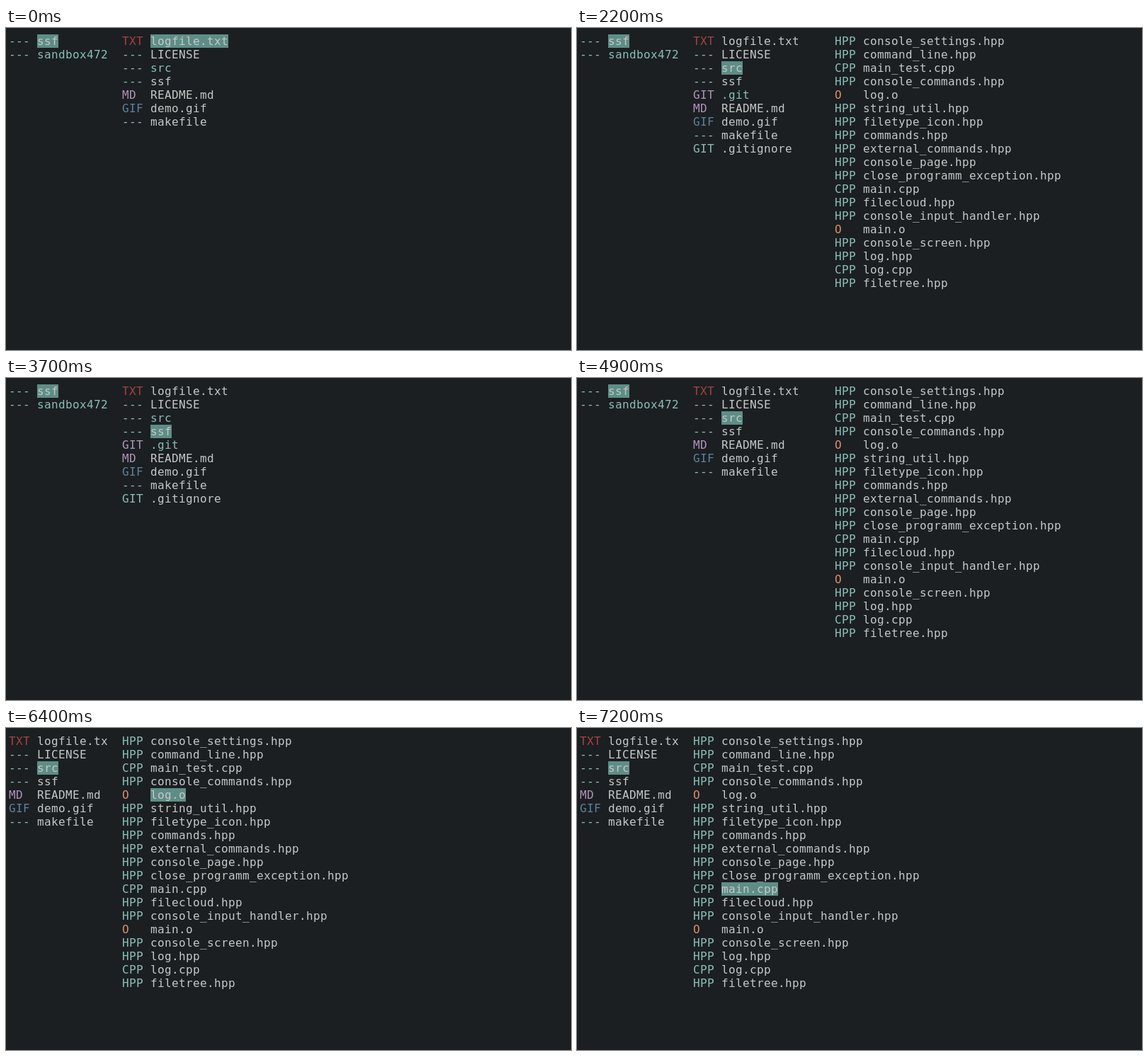
An HTML page with a canvas for the animation above (8 s loop, 798x455 px).

```html
<!DOCTYPE html>
<html lang="en">
<head>
<meta charset="utf-8">
<title>Terminal file browser</title>
<style>
  html, body { margin: 0; width: 100%; height: 100%; overflow: hidden; background: #1b1f22; }
  canvas { display: block; }
</style>
</head>
<body>
<canvas id="screen" width="798" height="455"></canvas>
<script>
const ctx = document.getElementById('screen').getContext('2d');
const LOOP = 8000, CELL = 10, ROW = 19, LEFT = 4, TOP = 9, ASCENT = 15;
const COLUMNS = [0, 16, 36];
const ICON_WIDTH = 4, PARENT_NAME_WIDTH = 10;
const BACK = '#1b1f22', TEXT = '#c5c8c6', TEAL = '#8abeb7', MARK = '#5e8d87';
const ICON_COLORS = { TXT: '#a54242', MD: '#b294bb', GIF: '#5f819d', O: '#de8f6c' };

// A trailing slash marks a directory.
function parse(list) {
  return list.trim().split(/\s+/).map(item => {
    const isDir = item.endsWith('/');
    const name = item.replace('/', '');
    const ext = name.includes('.') ? name.split('.').pop().toUpperCase() : '---';
    const icon = ext === 'GITIGNORE' ? 'GIT' : ext;
    const iconColor = name === '.git' ? '#b294bb' : ICON_COLORS[icon] || TEAL;
    return { name, icon, iconColor, color: isDir ? TEAL : TEXT };
  });
}

const home = parse('ssf/ sandbox472/');
const allFiles = parse('logfile.txt LICENSE src/ ssf .git/ README.md demo.gif makefile .gitignore');
const visibleFiles = allFiles.filter(file => !file.name.startsWith('.'));
const sources = parse(`console_settings.hpp command_line.hpp main_test.cpp console_commands.hpp
  log.o string_util.hpp filetype_icon.hpp commands.hpp external_commands.hpp console_page.hpp
  close_programm_exception.hpp main.cpp filecloud.hpp console_input_handler.hpp main.o
  console_screen.hpp log.hpp log.cpp filetree.hpp`);
const gitFiles = parse(`hooks/ info/ description refs/ HEAD branches/ objects/ index
  logs/ packed-refs ORIG_HEAD FETCH_HEAD COMMIT_EDITMSG config`);

const inProject = (files, selected, preview = []) =>
  [[home, 0], [files, selected], [preview, -1]];
const inSources = selected => [[visibleFiles, 2], [sources, selected]];

const timeline = [
  [0, inProject(visibleFiles, 0)],
  [1200, inProject(visibleFiles, 1)],
  [1400, inProject(visibleFiles, 2, sources)],
  [2200, inProject(allFiles, 2, sources)],
  [3000, inProject(allFiles, 3)],
  [3400, inProject(allFiles, 4, gitFiles)],
  [3700, inProject(allFiles, 3)],
  [4000, inProject(allFiles, 2, sources)],
  [4900, inProject(visibleFiles, 2, sources)],
  [5500, inSources(0)],
  [6000, inSources(1)],
  [6400, inSources(4)],
  [6500, inSources(7)],
  [6700, inSources(8)],
  [6900, inSources(9)],
  [7100, inSources(10)],
  [7200, inSources(11)]
];

// Each character sits in its own terminal cell.
function write(text, column, row, color) {
  ctx.fillStyle = color;
  [...text].forEach((char, i) =>
    ctx.fillText(char, LEFT + (column + i) * CELL, TOP + row * ROW + ASCENT));
}

function drawList(files, selected, index) {
  const column = COLUMNS[index], nameColumn = column + ICON_WIDTH;
  files.forEach((file, row) => {
    const name = index === 0 ? file.name.slice(0, PARENT_NAME_WIDTH) : file.name;
    write(file.icon, column, row, file.iconColor);
    if (row === selected) {
      ctx.fillStyle = MARK;
      ctx.fillRect(LEFT + nameColumn * CELL, TOP + row * ROW, name.length * CELL, ROW);
    }
    write(name, nameColumn, row, row === selected ? TEXT : file.color);
  });
}

function draw(now) {
  const time = now % LOOP;
  const [, lists] = timeline.findLast(([start]) => start <= time);
  ctx.fillStyle = BACK;
  ctx.fillRect(0, 0, 798, 455);
  ctx.font = '16px "DejaVu Sans Mono", monospace';
  lists.forEach(([files, selected], index) => drawList(files, selected, index));
}

const start = performance.now();
function tick() {
  draw(performance.now() - start);
  requestAnimationFrame(tick);
}
tick();
</script>
</body>
</html>
```
